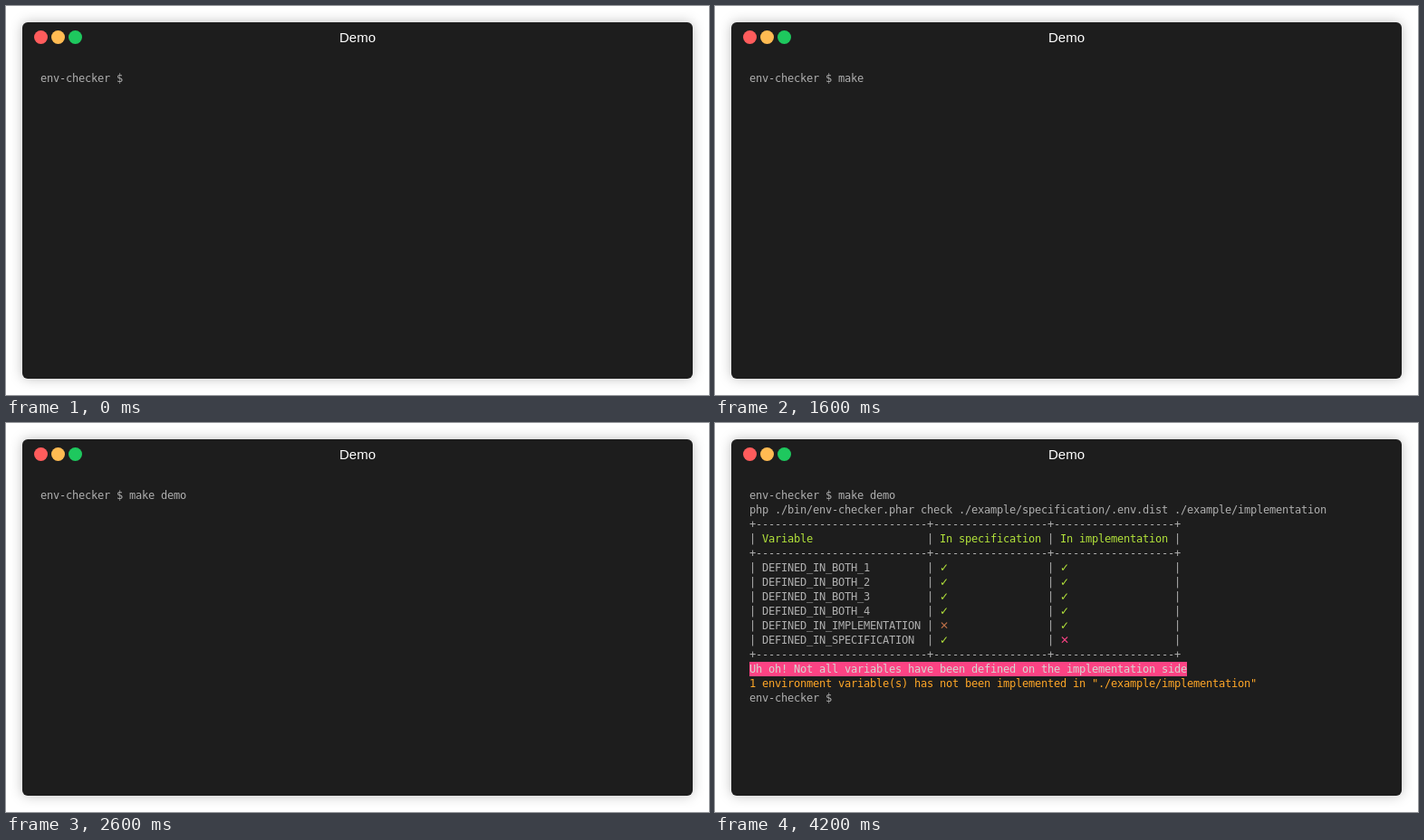
An HTML page for the animation above (8700 ms loop, 776 px wide and 430 px high).

```html
<!DOCTYPE html>
<html lang="en">
<head>
<meta charset="utf-8">
<title>Demo</title>
<style>
  html, body {
    margin: 0;
    width: 100%;
    height: 100%;
    overflow: hidden;
    background: #fff;
  }
  .window {
    position: absolute;
    left: 18px;
    top: 18px;
    width: 740px;
    height: 394px;
    border-radius: 6px;
    background: #1d1d1d;
    box-shadow: 0 0 14px rgba(0, 0, 0, .25);
  }
  .dot {
    position: absolute;
    left: 13px;
    top: 9px;
    width: 15px;
    height: 15px;
    border-radius: 50%;
    background: #ff5c5c;
  }
  .dot.min { left: 32px; background: #ffbb52; }
  .dot.max { left: 51px; background: #1ec85e; }
  .title {
    position: absolute;
    left: 0;
    right: 0;
    top: 8px;
    text-align: center;
    font: 15px/18px "Liberation Sans", Arial, sans-serif;
    color: #fff;
  }
  /* every character sits on a 7 x 16 px grid */
  pre {
    position: absolute;
    left: 20px;
    top: 54px;
    margin: 0;
    font: 12px/16px "DejaVu Sans Mono", monospace;
    font-variant-ligatures: none;
    letter-spacing: calc(7px - 1ch);
    color: #afafaf;
  }
  pre.output {
    top: 70px;
    width: 700px;
    overflow: hidden;
    animation: print 8.7s step-end infinite;
  }
  .typed {
    display: inline-block;
    height: 16px;
    vertical-align: top;
    overflow: hidden;
    animation: type 8.7s step-end infinite;
  }
  b, i, u, em {
    font-style: normal;
    font-weight: normal;
    text-decoration: none;
  }
  b { color: #b3e33b; }
  em { color: #ffa727; }
  u {
    display: inline-block;
    height: 16px;
    vertical-align: top;
    color: #d5d5d0;
    background: #fc4384;
  }
  i {
    display: inline-block;
    width: 7px;
    height: 16px;
    vertical-align: top;
    font-family: "DejaVu Sans", sans-serif;
    letter-spacing: 0;
    color: #b3e33b;
  }
  i.extra { color: #bd7048; }
  i.missing { color: #fc4384; }

  @keyframes type {
    0%      { width: 0; }
    11.494% { width: 7px; }
    13.793% { width: 14px; }
    16.091% { width: 21px; }
    18.390% { width: 28px; }
    22.988% { width: 42px; }
    25.287% { width: 49px; }
    27.586% { width: 56px; }
    29.885%, 100% { width: 63px; }
  }
  @keyframes print {
    0%      { height: 0; }
    34.482% { height: 16px; }
    45.977% { height: 208px; }
    48.275%, 100% { height: 224px; }
  }
</style>
</head>
<body>
<div class="window">
  <span class="dot"></span><span class="dot min"></span><span class="dot max"></span>
  <div class="title">Demo</div>
<pre>env-checker $ <span class="typed">make demo</span></pre>
<pre class="output">php ./bin/env-checker.phar check ./example/specification/.env.dist ./example/implementation
+---------------------------+------------------+-------------------+
|<b> Variable                  </b>|<b> In specification </b>|<b> In implementation </b>|
+---------------------------+------------------+-------------------+
| DEFINED_IN_BOTH_1         | <i>✓</i>                | <i>✓</i>                 |
| DEFINED_IN_BOTH_2         | <i>✓</i>                | <i>✓</i>                 |
| DEFINED_IN_BOTH_3         | <i>✓</i>                | <i>✓</i>                 |
| DEFINED_IN_BOTH_4         | <i>✓</i>                | <i>✓</i>                 |
| DEFINED_IN_IMPLEMENTATION | <i class="extra">✕</i>                | <i>✓</i>                 |
| DEFINED_IN_SPECIFICATION  | <i>✓</i>                | <i class="missing">✕</i>                 |
+---------------------------+------------------+-------------------+
<u>Uh oh! Not all variables have been defined on the implementation side</u>
<em>1 environment variable(s) has not been implemented in "./example/implementation"</em>
env-checker $ </pre>
</div>
</body>
</html>
```
